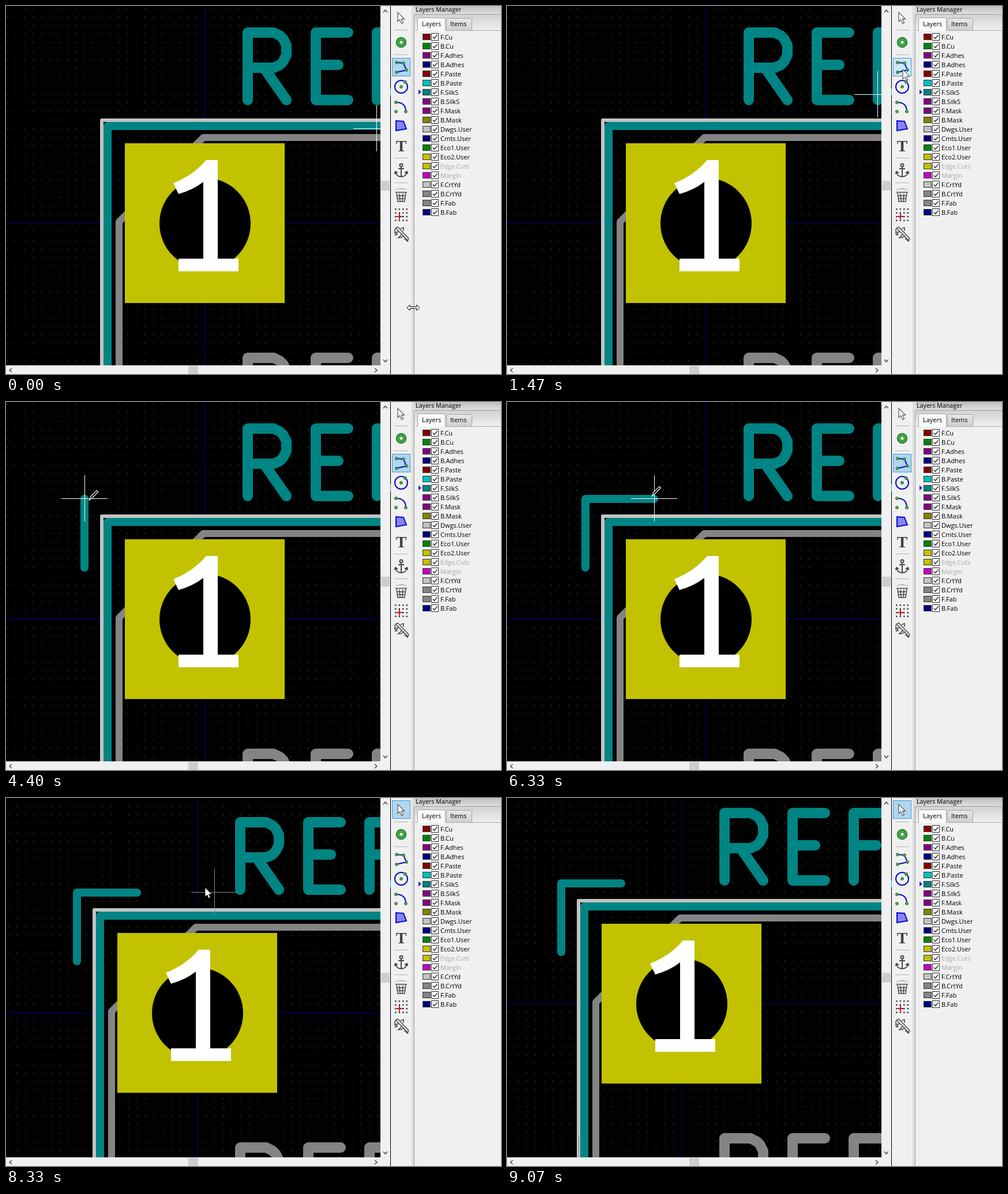
An HTML page with a canvas that plays this animation: 858x638 px, repeating every 9.54 s.

```html
<!DOCTYPE html>
<html lang="en">
<head>
<meta charset="utf-8">
<title>Layout editor</title>
<style>
html, body { margin: 0; width: 100%; height: 100%; overflow: hidden; background: #f0f0f0; }
canvas, svg { position: absolute; left: 0; top: 0; display: block; }
text { font: 11px "Open Sans", sans-serif; fill: #000; }
.blue { fill: none; stroke: #0a0ac8; stroke-width: 2; }
.dot { fill: #48a048; stroke: #2c7c34; stroke-width: .8; }
.ink { fill: none; stroke: #484848; stroke-width: 2; }
.chev { fill: none; stroke: #505050; stroke-width: 1.6; }
.tool { stroke: #3c96dc; fill: #b1d6f0; }
</style>
</head>
<body>
<canvas id="board" width="649" height="623"></canvas>
<svg id="ui" width="858" height="638" viewBox="0 0 858 638">
  <defs>
    <linearGradient id="bar" x2="0" y2="1"><stop stop-color="#bebebe"/><stop offset="1" stop-color="#dedede"/></linearGradient>
    <linearGradient id="strip" x2="0" y2="1"><stop stop-color="#d2d2d2"/><stop offset="1" stop-color="#f0f0f0"/></linearGradient>
    <linearGradient id="tab" x2="0" y2="1"><stop stop-color="#e8e8e8"/><stop offset="1" stop-color="#d0d0d0"/></linearGradient>
  </defs>

  <path fill="#f0f0f0" d="M649 0H858V638H0V623H649Z"/>
  <path fill="#cdcdcd" d="M650 303h15v17h-15zM316 624h17v14h-17z"/>
  <path class="chev" d="M654 11l3.500-4 3.500 4M654 613l3.500 4 3.500-4M10 628l-4 3.500 4 3.500M639 628l4 3.500-4 3.500"/>
  <path stroke="#000" d="M666.500 0V638"/>
  <path stroke="#00c2c2" d="M666.500 143V155"/>
  <path fill="#dcdcdc" d="M703 0h4v638h-4z"/>

  <rect id="pick" class="tool" x="669.5" y="4.500" width="31" height="31"/>
  <rect id="line" class="tool" x="669.5" y="90.500" width="31" height="31"/>
  <path stroke="#b4b4b4" d="M673 41.500h24M673 84.500h24M673 263.500h24M673 306.500h24"/>
  <path fill="#fff" stroke="#606060" stroke-width="1.300" d="M679 11V27L682.500 23.500 686 30.500 688.500 29 685.500 22.500H690.500Z"/>
  <circle cx="685" cy="63" r="8.500" fill="#40a844" stroke="#1f7a28" stroke-width="1.500"/>
  <circle cx="685" cy="63" r="3.300" fill="#fff" stroke="#1f7a28"/>
  <path class="blue" d="M677 98L689 99 694 111 677 115M676 167Q693 167 693 183"/>
  <circle class="blue" cx="685" cy="140" r="11"/>
  <path class="blue" style="fill:#8484f4" d="M676 199L689 200 694 213 676 216Z"/>
  <g id="nodes"></g>
  <text x="685" y="252" text-anchor="middle" style="font:bold 28px 'Liberation Serif',serif;fill:#404040">T</text>
  <g class="ink">
    <circle cx="685" cy="276" r="2.500"/>
    <path d="M685 279V296M680 282h10M675 287q1 9 10 9t10-9M673.500 291l1.500-4 4 2.500M696.500 291l-1.500-4-4 2.500"/>
    <path stroke-width="1.500" d="M675 323h20M677 324l2 15h12l2-15M682 325l1 14M688 325l-1 14M678 329h14M679 334h12"/>
    <path stroke="#a0a0a0" stroke-width="1" d="M675 319q10-5 20 0M682 317h6"/>
    <path stroke-width="1.500" d="M675 385l21 21M679 383l19 20M675 385l5-2M674 386v8l3-3M680 390l-5 7 4-1M684 386l5-2 0 6M686 396l-6 6 6-1 4-3M690 403l6 5 2-5"/>
  </g>
  <g id="grid" fill="#404040"></g>
  <path stroke="#d01818" stroke-width="2" d="M677 365h10M682 360v10"/>

  <path fill="url(#bar)" d="M708 0h150v14h-150z"/>
  <path fill="url(#strip)" d="M708 15h150v27h-150z"/>
  <path stroke="#a0a0a0" fill="none" d="M858 14.500H707.500V638"/>
  <text x="710" y="10" style="font-size:10.700px">Layers Manager</text>
  <path fill="url(#tab)" stroke="#a0a0a0" d="M763.500 42V23.500q0-2 2-2h40q2 0 2 2V42"/>
  <path stroke="#a8a8a8" d="M709 42.500H858"/>
  <path fill="#fafafa" stroke="#a0a0a0" d="M713.500 43V22.500q0-2 2-2h44q2 0 2 2V43"/>
  <text x="721" y="35">Layers</text>
  <text x="770" y="35">Items</text>
  <path fill="#2828d8" d="M715 144.500l5 4.500-5 4.500z"/>
  <g id="layers"></g>

  <path id="arrow" fill="#fff" stroke="#000" stroke-width=".8" d="M0 0V16.500L3.800 13 6.300 19 9 17.800 6.500 12H11.700Z"/>
  <path id="pencil" fill="#000" stroke="#fff" stroke-width="1.200" d="M1.500 0L3.500-6 14-16.500 16.500-14 6-3.500Z"/>
  <path id="sash" fill="#fff" stroke="#000" d="M-11 0l5-5v3.500H6V-5l5 5-5 5V1.500H-6V5Z"/>
</svg>
<script>
const TEAL = '#008484', GREY = '#848484', PALE = '#c2c2c2';
const LOOP = 9540, TICK = 1000 / 15, STEP = 14.9, OX = 344.8, OY = 376.5;
const $ = id => document.getElementById(id);
const c = $('board').getContext('2d');

// Static lists in the side panels
const layers = `F.Cu 840000,B.Cu 008400,F.Adhes 840084,B.Adhes 000084,F.Paste 840000,B.Paste 00c2c2,
F.SilkS 008484,B.SilkS 840084,F.Mask 840084,B.Mask 848400,Dwgs.User c2c2c2,Cmts.User 000084,Eco1.User 008400,
Eco2.User c2c200,Edge.Cuts c2c200,Margin c200c2,F.CrtYd c2c2c2,B.CrtYd 848484,F.Fab 848484,B.Fab 000084`;
$('layers').innerHTML = layers.split(',').map((row, i) => {
  const [name, color] = row.trim().split(' ');
  const y = 48 + i * 16, ink = /Edge|Margin/.test(name) ? '#a8a8a8' : '#000';
  return `<rect x="722.5" y="${y + .5}" width="13" height="10" fill="#${color}" stroke="#303030"/>
    <rect x="737.5" y="${y - .5}" width="12" height="12" fill="#fff" stroke="#303030"/>
    <path d="M740 ${y + 5.5}l2.500 3 5-6" fill="none" stroke="#202020" stroke-width="1.300"/>
    <text x="753" y="${y + 10}" style="fill:${ink}">${name}</text>`;
}).join('');
$('nodes').innerHTML = [[677, 98], [689, 99], [694, 111], [677, 115], [685, 140], [692, 132], [676, 167], [676, 183], [693, 183]]
  .map(([x, y]) => `<circle class="dot" cx="${x}" cy="${y}" r="2.600"/>`).join('');
for (let i = 0; i < 16; i++)
  $('grid').innerHTML += `<rect x="${674 + i % 4 * 6.5}" y="${351 + (i >> 2) * 6.5}" width="2.500" height="2.500"/>`;

// Pointer and pan tracks: [time, x, y]
const pointer = [[0, 706, 523], [540, 141, 300], [1000, 691, 138], [1333, 686, 110], [1470, 686, 110],
  [2400, 148, 244], [3000, 143, 290], [3600, 143, 290], [3930, 146, 245], [4400, 143, 170], [4940, 143, 170],
  [5070, 141, 173], [5540, 141, 173], [5930, 253, 161], [6270, 253, 161], [6330, 250, 163], [6600, 240, 168],
  [6880, 240, 168], [7000, 239, 169], [7420, 239, 169], [8100, 370, 163], [8200, 358, 159], [8330, 345, 155],
  [8600, 316, 139], [9070, 124, 632]];
const pan = [[8200, 0, 0], [8330, -13, -4], [8600, -42, -20]];

function at(track, t) {
  const i = track.findIndex(k => k[0] >= t - 4);
  if (i < 0) return track[track.length - 1].slice(1);
  if (!i) return track[0].slice(1);
  const [t0, x0, y0] = track[i - 1], [t1, x1, y1] = track[i];
  let p = Math.min(1, (t - t0) / (t1 - t0));
  if (t1 - t0 > 400) p = p * p * (3 - 2 * p);
  return [x0 + (x1 - x0) * p, y0 + (y1 - y0) * p];
}

const snap = (v, origin) => origin + Math.round((v - origin) / STEP) * STEP;

function crossAt(t, [mx, my], [px, py]) {
  if (t < 60) return [642, 212];
  if (t > 930 && t < 1530) return [642, 153];
  if (t > 8090 && t < 8620) return [374 + px, 167 + py];
  return [snap(Math.min(mx, 648), OX + px), snap(Math.min(my, 622), OY + py)].map(Math.floor);
}

function stroke(color, width, d) {
  c.strokeStyle = color;
  c.lineWidth = width;
  c.stroke(new Path2D(d));
}

function fill(color, d) {
  c.fillStyle = color;
  c.fill(new Path2D(d));
}

const REF = 'M419 163V46H464L475 51.500 480.500 57 486 68V85L480.500 96 475 102 464 107H419M447 107L486 163' +
  'M593 46H537V163H593M537 102H576M699 46H643V163M643 102H682';
const ONE = 'M347 267H367V438H403V460H299V438H342V305Q324 319 299 326L290 307Q324 294 347 267Z';

function drawBoard(t, [px, py], [cx, cy]) {
  c.setTransform(1, 0, 0, 1, 0, 0);
  c.fillStyle = '#000';
  c.fillRect(0, 0, 649, 623);

  c.fillStyle = GREY;
  for (let x = (OX + px) % STEP; x < 649; x += STEP)
    for (let y = (OY + py) % STEP; y < 623; y += STEP) c.fillRect(x - .5, y - .5, 1, 1);

  c.translate(px, py);
  c.lineCap = c.lineJoin = 'round';
  stroke('#000084', 1, 'M344.5 -9V700M-9 376.500H720');
  stroke(GREY, 12, 'M196 700V374L342 228H720');
  stroke(PALE, 6, 'M166 700V198H720');
  stroke(TEAL, 14, 'M176 700V208H720');
  fill('#c2c200', 'M206 238h277v277h-277z');
  fill('#000', 'M266 377a79 79 0 0 1 158 0a79 79 0 0 1 -158 0z');
  fill('#fff', ONE);
  stroke(TEAL, 18, REF);
  c.translate(0, 564);
  stroke(GREY, 18, REF);
  c.translate(0, -564);

  // Track being drawn: upright first, then the top edge
  if (t > 3650) {
    const top = t < 4990 ? Math.min(287, cy + .7) : 168;
    const right = t < 4990 ? 136 : t < 6900 ? Math.max(136, cx) : 240;
    stroke(TEAL, 14, `M136 287V${top}H${right}`);
  }

  c.setTransform(1, 0, 0, 1, 0, 0);
  c.fillStyle = t < 7260 ? '#fff' : '#8c8c8c';
  c.fillRect(cx - 40, cy, 80, 1);
  c.fillRect(cx, cy - 40, 1, 80);
}

function place(id, on, [x, y]) {
  $(id).style.display = on ? '' : 'none';
  $(id).setAttribute('transform', `translate(${Math.round(x)} ${Math.round(y)})`);
}

function frame(now) {
  const t = Math.floor(((now % LOOP) + 3) / TICK) * TICK;
  const m = at(pointer, t), p = at(pan, t).map(Math.round);
  const picking = t > 7260, onSash = t < 60, visible = t < 9060;
  const drawing = !picking && m[0] < 649;

  drawBoard(t, p, crossAt(t, m, p));
  place('sash', onSash, m);
  place('pencil', drawing, m);
  place('arrow', visible && !onSash && !drawing, m);
  $('pick').style.display = picking ? '' : 'none';
  $('line').style.display = picking ? 'none' : '';
  $('line').style.fill = t > 1060 && t < 1530 ? '#cde6f9' : '';
  requestAnimationFrame(frame);
}
requestAnimationFrame(frame);
</script>
</body>
</html>
```
